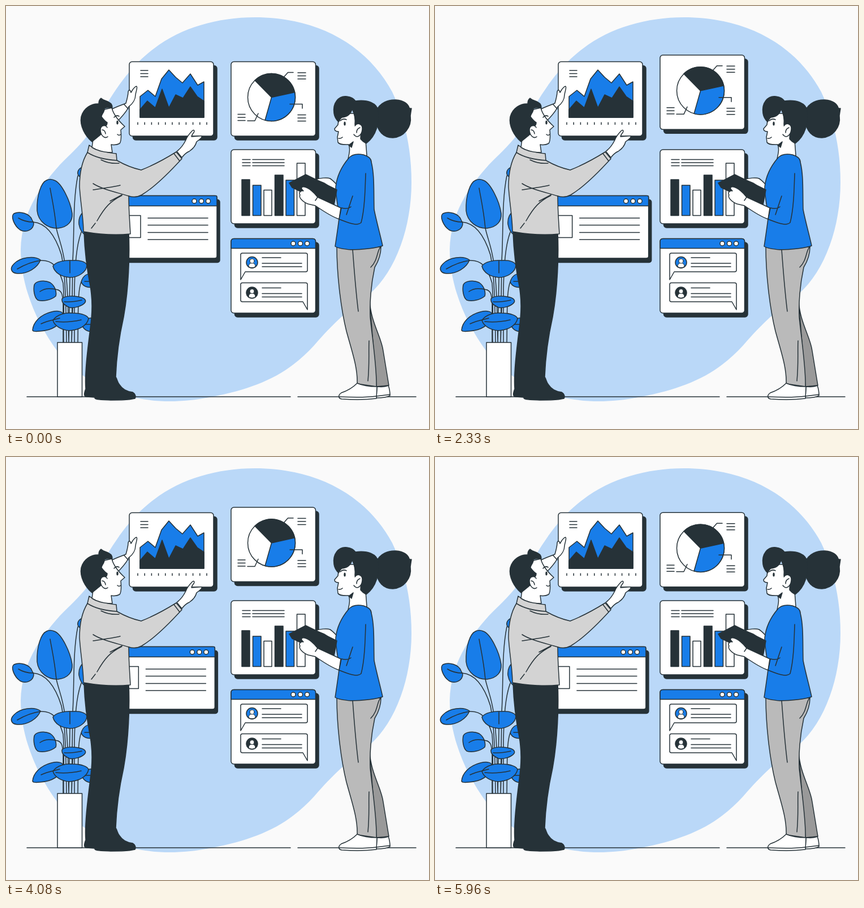
An HTML page for the animation above (6000 ms loop, 748x748 px).

```html
<!DOCTYPE html>
<html lang="en">
<head>
<meta charset="utf-8">
<title>Dashboard planning</title>
<style>
  html, body { margin: 0; width: 100%; height: 100%; overflow: hidden; background: #fafafa; }
  svg { display: block; width: 100vw; height: 100vh; stroke: #263238; stroke-width: 1.5; stroke-linecap: round; stroke-linejoin: round; fill: none; }
  .w { fill: #fff; }
  .b { fill: #187de9; }
  .d { fill: #263238; }
  .shirt { fill: #d3d3d3; }
  .leg { fill: #bababa; }
  .back { fill: #999; }
  .flat { stroke: none; }
</style>
</head>
<body>
<svg viewBox="0 0 748 748">
  <path class="flat" fill="#bad8f8" d="M440 20C555 20 640 72 683 152C706 200 717 255 717 312C717 390 690 470 640 512C600 542 580 560 545 600C495 655 440 676 365 691C335 697 310 699 290 699C215 699 140 672 92 612C50 555 26 490 26 430C28 365 60 320 95 281C120 255 140 240 160 205C185 160 215 110 262 75C310 38 375 20 440 20Z"/>
  <path d="M37 691H503M516 691H725"/>

  <!-- plant -->
  <g id="plant">
    <path d="M89 393C94 415 100 425 104 455C110 500 110 550 111 595M48 382C72 384 88 408 98 440C106 480 106 540 107 595M61 450C82 449 92 460 101 490C104 530 101 560 102 595M92 502C99 505 100 510 101 525V595M127 300C118 345 121 400 118 450L116 595M133 400C124 425 122 460 121 500V595M133 488C126 505 128 550 127 595M113 480L111 595M118 534L116 595"/>
    <g class="b">
      <path d="M72 308C62 312 54 335 55 362C57 382 75 394 92 393C110 391 118 380 117 367C114 345 98 312 85 308C80 306 76 306 72 308Z"/>
      <path d="M46 378C42 367 25 362 14 367C8 372 14 388 25 396C36 402 49 395 49 384Z"/>
      <path d="M61 449C50 441 25 444 14 456C6 464 9 472 20 473C38 474 56 463 61 449Z"/>
      <path d="M50 493C53 486 68 484 78 489C87 495 90 506 88 513C80 520 65 523 56 520C50 515 48 502 50 493Z"/>
      <path d="M47 573C48 560 60 546 80 541C92 538 101 540 101 546C98 565 80 574 60 575C50 576 47 575 47 573Z"/>
      <path d="M134 563C138 553 148 550 158 553L160 575C148 578 137 574 134 563Z"/>
      <path d="M133 488C136 476 145 472 155 473V497C145 499 136 496 133 488Z"/>
      <path d="M142 362C132 365 128 375 129 386C131 398 136 403 142 406Z"/>
      <path d="M138 284C129 286 126 292 127 297C129 303 134 304 138 302Z"/>
      <path d="M83 460C88 452 104 449 118 450C130 449 141 452 143 458C143 470 128 480 113 480C98 479 86 472 83 460Z"/>
      <path d="M99 518C103 512 120 512 132 515C139 517 142 520 140 524C135 531 120 535 112 533C104 530 98 524 99 518Z"/>
      <path d="M83 556C90 545 105 542 118 543C135 543 145 548 146 553C143 565 130 573 112 574C98 573 86 566 83 556Z"/>
    </g>
    <path d="M78 322C80 335 86 360 89 393M22 375C30 380 38 382 48 382M20 465C32 458 46 452 61 450M113 451V472M60 505C70 498 80 499 92 502M103 523C115 524 125 522 134 520M62 562C75 556 85 555 95 552M88 558C105 560 120 558 133 555M139 487H147M140 563H150"/>
    <path class="w" d="M91 595H134.500V691H91Z"/>
  </g>

  <!-- area chart -->
  <rect class="d" x="224.500" y="105.500" width="148.500" height="131.500" rx="5"/>
  <rect class="w" x="218" y="98.500" width="149" height="131.500" rx="5"/>
  <path d="M238 114H251M238 119.500H251M238 125H251"/>
  <path class="b" d="M237 160L251 149L264 160L275 129L288 113L300 126L312 136L326 120L339 140L350 134V197H237Z"/>
  <path class="d" d="M237 183L250 168L264 180L276 147L288 180L300 157L313 163L326 143L338 160L350 168V197H237Z"/>
  <path id="ticks" stroke-linecap="butt"/>

  <!-- pie chart -->
  <g id="pie">
    <rect class="d" x="404.500" y="105.500" width="148.500" height="131.500" rx="5"/>
    <rect class="w" x="398" y="98.500" width="149.500" height="131.500" rx="5"/>
    <circle class="w" cx="469.500" cy="161.500" r="42"/>
    <path class="d" d="M469.500 161.500L440 131.500A42 42 0 0 1 510.500 152.500Z"/>
    <path class="b" d="M469.500 161.500L510.500 152.500A42 42 0 0 1 458 202Z"/>
    <path d="M491 126L498.500 117.500H508M502 173.500H524V181M446 190L440 203H427M516 118H530M516 123.500H530M516 129H530M516 192.500H530M516 198H530M516 203.500H530M410 191.500H423M410 197H423M410 202.500H423"/>
  </g>

  <!-- bar chart -->
  <rect class="d" x="404.500" y="261" width="148.500" height="131" rx="5"/>
  <rect class="w" x="398" y="254" width="149.500" height="131" rx="5"/>
  <path d="M418 271.500H432M418 277H432M418 282.500H432M436 271.500H492M436 277H492M436 282.500H492"/>
  <path class="d" d="M417 307H431V370.500H417ZM475.500 299H490V370.500H475.500Z"/>
  <path class="b" d="M436.500 317H451V370.500H436.500ZM495 308H509.500V370.500H495Z"/>
  <path class="w" d="M456 325.500H470V370.500H456ZM514.500 278H529V370.500H514.500Z"/>

  <!-- browser window -->
  <g id="browser">
    <rect class="d" x="193" y="342.500" width="185" height="111" rx="4"/>
    <rect class="w" x="187" y="335.500" width="186" height="110.500" rx="4"/>
    <path class="b" d="M187 353.500V335.500H371Q373 335.500 373 338V353.500Z"/>
    <g class="w"><circle cx="333" cy="345" r="4"/><circle cx="345.500" cy="345" r="4"/><circle cx="357.500" cy="345" r="4"/></g>
    <path d="M199 370.500H238V409.500H199ZM251 375H357M251 387.500H357M251 400.500H357M251 413H357"/>
  </g>

  <!-- chat window -->
  <g id="chat">
    <rect class="d" x="404.500" y="418" width="148.500" height="132" rx="5"/>
    <rect class="w" x="398" y="411.500" width="149.500" height="131.500" rx="5"/>
    <path class="b" d="M398 428.500V416.500Q398 411.500 403 411.500H542.500Q547.500 411.500 547.500 416.500V428.500Z"/>
    <g class="w"><circle cx="508" cy="420" r="4"/><circle cx="520.500" cy="420" r="4"/><circle cx="532.500" cy="420" r="4"/></g>
    <path class="w" d="M418 437H530Q533 437 533 440V467Q533 470 530 470H423L415 484V440Q415 437 418 437Z"/>
    <path class="w" d="M418 489.500H530Q533 489.500 533 492.500V537L525 523H418Q415 523 415 520V492.500Q415 489.500 418 489.500Z"/>
    <circle class="b" cx="435" cy="453.500" r="10"/>
    <circle class="d" cx="435" cy="507" r="10"/>
    <g id="users" class="w" stroke-width="1"></g>
    <path d="M453 445H486M453 455H523M453 461H523M453 498.500H486M453 508.500H523M453 514.500H523"/>
  </g>

  <!-- man -->
  <g>
    <path class="w" d="M186 183C195 178 205 175 212 172C214 165 216 158 216 152C217 147 220 148 221 153C224 148 227 142 231 142C233 144 230 150 229 157C229 165 224 173 217 178C213 188 204 196 198 203Z"/>
    <path d="M209 174L216 182"/>
    <path class="d" d="M138 400H217C219 440 217 500 208 550C199 590 195 630 194 656C197 660 196 664 201 670C206 678 214 682 224 683C229 686 230 691 228 694C215 697 205 697 185 697C162 696 156 696 157 692L143 691C137 691 138 685 141 677C139 650 144 610 149 570C153 540 153 520 149 495C143 465 139 430 138 400Z"/>
    <path class="shirt" d="M147 246C157 254 180 260 195 261L196 273C210 281 225 287 239 290C262 281 285 268 301 258L311 270C290 293 262 321 240 334C231 339 223 338 217 336C217 360 219 385 220 403C190 406 160 403 137 399C137 375 132 350 130 320C130 295 134 275 144 259Z"/>
    <path d="M144 259C158 268 178 272 196 273M168 272C178 277 190 279 200 278M154 314C170 324 190 328 217 336M154 325C175 322 190 320 202 317M205 335C185 345 175 355 161 380M158 384L151 393M184 345L205 334M297 261L307 274"/>
    <path class="w" d="M302 257C309 252 314 245 318 237C320 231 326 224 330 220C333 218 334 222 331 225C329 228 328 230 328 231C335 231 343 229 346 230C348 232 340 238 337 240C335 248 330 253 324 257C317 260 314 264 311 268Z"/>
    <path class="w" d="M165 185L187 180C190 192 199 203 210 213L203 219C204 230 204 239 201 243C196 246 191 246 186 245L188 259C172 259 160 255 152 250L154 236Z"/>
    <path class="d" d="M152 240C140 230 130 212 133 196C137 180 152 172 164 173C164 169 165 165 168 163C173 168 180 167 186 173C188 176 188 178 188 180C183 180 178 179 174 181C175 187 168 192 169 196C172 200 175 204 179 206C179 210 177 213 174 212C168 210 165 219 168 227C162 232 157 236 152 240Z"/>
    <path class="w" d="M179 215C176 209 167 211 167 219C167 228 174 236 180 231"/>
    <path d="M170 219Q175 219 176 226M191 197Q195 192 200 195M197 227Q200 230 203 227"/>
    <ellipse class="d flat" cx="197" cy="206" rx="1.700" ry="3.500"/>
  </g>

  <!-- woman -->
  <g>
    <path class="back" d="M643 520C645 560 664 585 667 610L677 671L655 673Z"/>
    <path class="leg" d="M585 426C585 470 591 530 602 575C613 615 622 640 621 668L655 673C656 640 648 590 644 550C643 520 646 490 652 462C657 454 663 443 663 426Z"/>
    <path d="M663 426C656 430 658 450 645 462M613 431C616 470 618 500 623 540M642 592C641 610 643 630 640 663"/>
    <path class="w" d="M656 673C666 674 672 673 676 671C678 676 679 682 679 689C674 692 665 693 655 693Z"/>
    <path class="w" d="M621 667C612 676 602 681 593 684C587 688 587 694 594 695C620 697 640 696 655 694L656 673C645 673 630 671 621 667Z"/>
    <path d="M589 691C610 692 640 692 655 690M655 690L679 687"/>
    <path class="d" d="M655 185C661 171 676 165 690 166C703 167 711 173 713 180Q715 182 717 181Q716 187 715 194C718 215 703 232 684 233C667 233 657 221 655 205Z"/>
    <path class="w" d="M596 190C590 198 587 203 587 210L581 217C581 221 585 222 588 222L586 232L587 241C590 246 600 245 606 245C609 252 607 261 605 270C615 280 633 276 638 264L636 238L626 190Z"/>
    <path class="d" d="M580 190C577 172 588 158 603 160C611 161 616 165 618 168C640 165 656 172 658 185C661 205 655 230 637 243C633 241 630 239 627 235L628 212L617 210C618 200 616 190 612 182C610 190 605 196 594 197C591 199 590 202 588 205C584 201 581 197 580 190Z"/>
    <path class="w" d="M617 212C622 205 631 209 630 218C629 228 621 236 615 227"/>
    <path class="d" d="M606 246L614 240L611 250Z"/>
    <path d="M626 215Q620 217 620 224M591 203Q596 198 602 201M588 234Q592 235 595 232"/>
    <ellipse class="d flat" cx="599" cy="208" rx="1.700" ry="3.500"/>
    <path class="w" d="M547 307C555 304 568 303 573 305C578 308 582 313 586 317L585 330C575 323 568 315 560 312Z"/>
    <path class="b" d="M606 269C612 262 622 261 632 263C642 266 646 270 646 276C652 300 650 330 651 360C656 385 662 405 666 424C655 428 630 431 610 431C598 430 588 429 582 425C585 405 588 385 589 375C588 355 583 340 583 320C585 300 595 282 606 269Z"/>
    <path class="d" d="M501 313L530 298L585 325L580 352L545 340L506 321Z"/>
    <path class="w" d="M592 357L551 338C545 330 535 321 528 320C523 319 520 322 526 327C521 326 517 330 520 334C517 338 524 346 534 350L547 353C560 362 575 372 589 377Z"/>
    <path d="M551 338L547 344"/>
    <path class="b" d="M593 357C600 359 607 357 611 354L636 296C635 330 634 360 628 383C620 390 605 383 589 377Z" stroke="none"/>
    <path d="M636 296C635 330 634 360 628 383C620 390 605 383 589 377L593 357C600 359 606 358 610 355M602 369L613 336"/>
  </g>
</svg>
<script>
const get = id => document.getElementById(id);

get('ticks').setAttribute('d', Array.from({ length: 11 }, (_, i) => `M${233 + i * 12.2} 205.5v4.5`).join(''));
get('users').innerHTML = [453.5, 507].map(y =>
  `<path d="M429 ${y + 7.5}Q429 ${y + 1} 435 ${y + 1}T441 ${y + 7.5}Q435 ${y + 11} 429 ${y + 7.5}Z"/>
   <circle cx="435" cy="${y - 2.5}" r="4"/>`).join('');

const LOOP = 6000, FPS = 24, UNIT = 748 / 500;

// Keyframes are [progress, value] pairs, joined linearly.
const FLOAT = [[0, 0], [.5, -10], [1, 0]];
const SHAKE = [[0, 0], [.1, -1], [.2, 2], [.3, -4], [.4, 4], [.5, -4], [.6, 4], [.7, -4], [.8, 2], [.9, -1], [1, 0]];
const BEAT = [[0, 1], [.1, 1.1], [.3, 1], [.4, 1], [.5, 1.1], [.6, 1], [1, 1]];

function at(keys, p) {
  const i = keys.findIndex(k => k[0] > p);
  const [a, from] = keys[i - 1], [b, to] = keys[i];
  return from + (to - from) * (p - a) / (b - a);
}

function draw(now) {
  const step = Math.floor((now + 5) * FPS / 1000);
  const p = step * 1000 / FPS % LOOP / LOOP;
  get('pie').setAttribute('transform', `translate(0 ${at(FLOAT, p) * UNIT})`);
  get('browser').setAttribute('transform', `translate(${at(SHAKE, p) * UNIT} 0)`);
  get('chat').setAttribute('transform', `translate(475.6 480.7) scale(${at(BEAT, p)}) translate(-475.6 -480.7)`);
  requestAnimationFrame(draw);
}
draw(performance.now());
</script>
</body>
</html>
```
